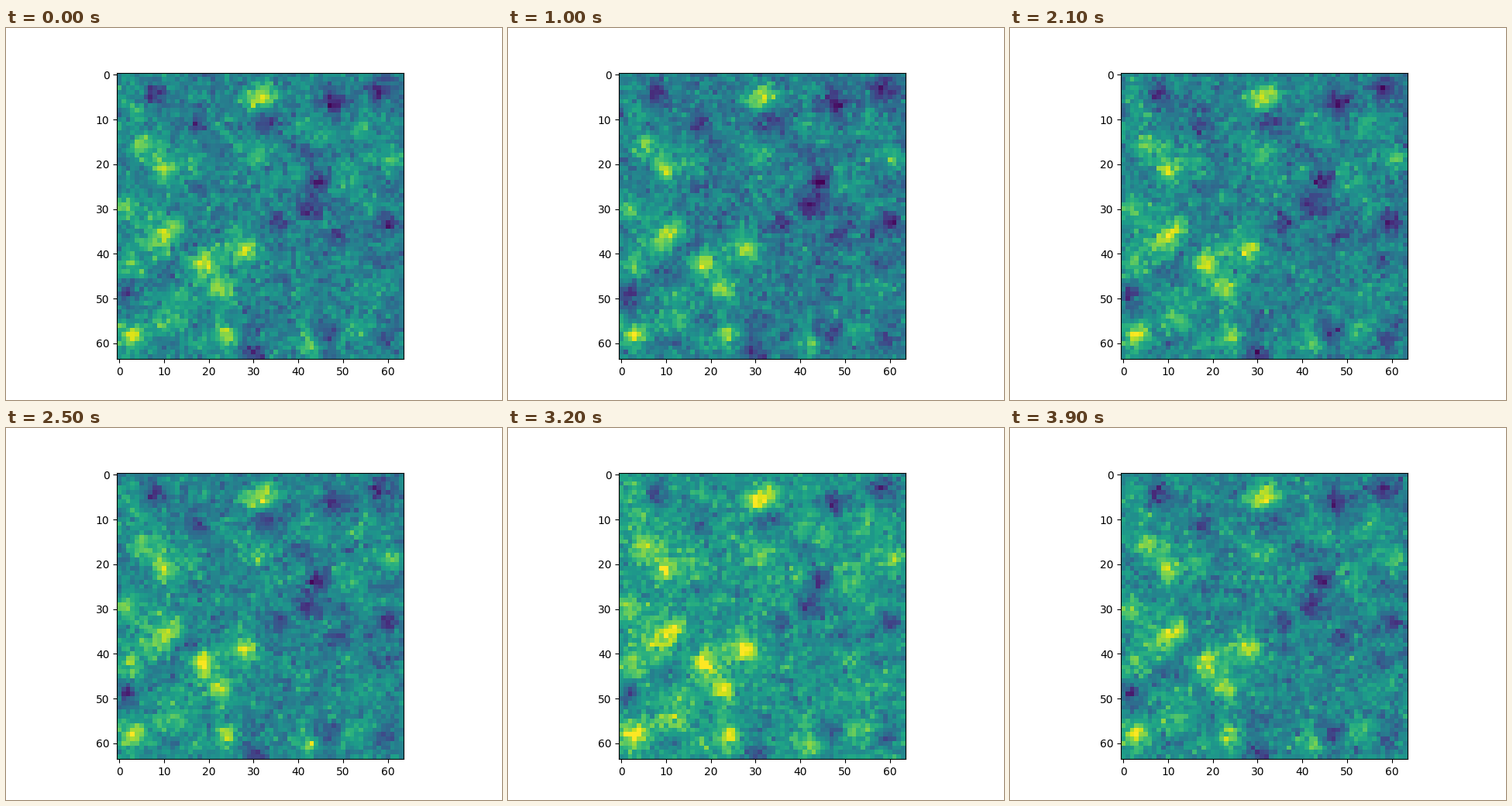
A matplotlib script for the animation above (4000 ms loop, 640 px wide and 480 px high).

```python
import numpy as np
import matplotlib.pyplot as plt
from matplotlib.animation import FuncAnimation

SIZE = 64
FRAMES = 40
INTERVAL = 100

# Landmark centres (x, y), strongest first
BRIGHT = [(28.5, 39), (10, 21), (18.5, 42), (3, 58), (30, 6), (24, 58),
          (9, 36.5), (23, 48), (33, 4), (12, 34), (2.5, 43), (5, 16),
          (32, 18), (42, 60), (61, 19), (53, 57), (1.5, 28.5), (11.5, 55),
          (53, 13)]
DARK = [(42, 30), (8, 4), (1.5, 49), (30.5, 62), (44, 24), (48, 6.5),
        (60, 33), (36, 33), (49, 36.5), (59, 58.5), (47, 57), (58, 3),
        (42, 18), (33, 11), (18, 11)]

Y, X = np.mgrid[:SIZE, :SIZE]


def spots(centres, strongest, weakest, radius=1.9):
    """Sum of soft spots whose strength falls evenly along the list."""
    strengths = np.linspace(strongest, weakest, len(centres))
    return sum(s * np.exp(-((X - cx) ** 2 + (Y - cy) ** 2) / (2 * radius ** 2))
               for (cx, cy), s in zip(centres, strengths))


def cloud(seed, slope=1.0):
    """Random field whose amplitude falls off with spatial frequency."""
    rng = np.random.default_rng(seed)
    freq = np.fft.fftfreq(SIZE)
    k = np.hypot(freq[:, None], freq[None, :])
    spectrum = np.fft.fft2(rng.normal(size=(SIZE, SIZE)))
    field = np.fft.ifft2(spectrum / np.maximum(k, 0.06) ** slope).real
    return (field - field.mean()) / field.std()


def make_base():
    base = spots(BRIGHT, 0.42, 0.18) - spots(DARK, 0.36, 0.16)
    base += 0.06 * cloud(7) - 0.0008 * X
    return base - base.mean()


BASE = make_base()


def field_at(i):
    noise = np.random.default_rng(100 + i).normal(0, 0.06, (SIZE, SIZE))
    turn = 2 * np.pi * i / FRAMES
    level = 0.485 - 0.045 * np.sin(turn) - 0.03 * np.cos(2 * turn - 0.4 * np.pi)
    return np.clip(level + BASE + noise, 0, 1)


fig, ax = plt.subplots(figsize=(6.4, 4.8), dpi=100)
image = ax.imshow(field_at(0), cmap="viridis", vmin=0, vmax=1)


def update(i):
    image.set_data(field_at(i))
    return [image]


anim = FuncAnimation(fig, update, frames=FRAMES, interval=INTERVAL,
                     repeat=True, repeat_delay=0)
plt.show()
```
